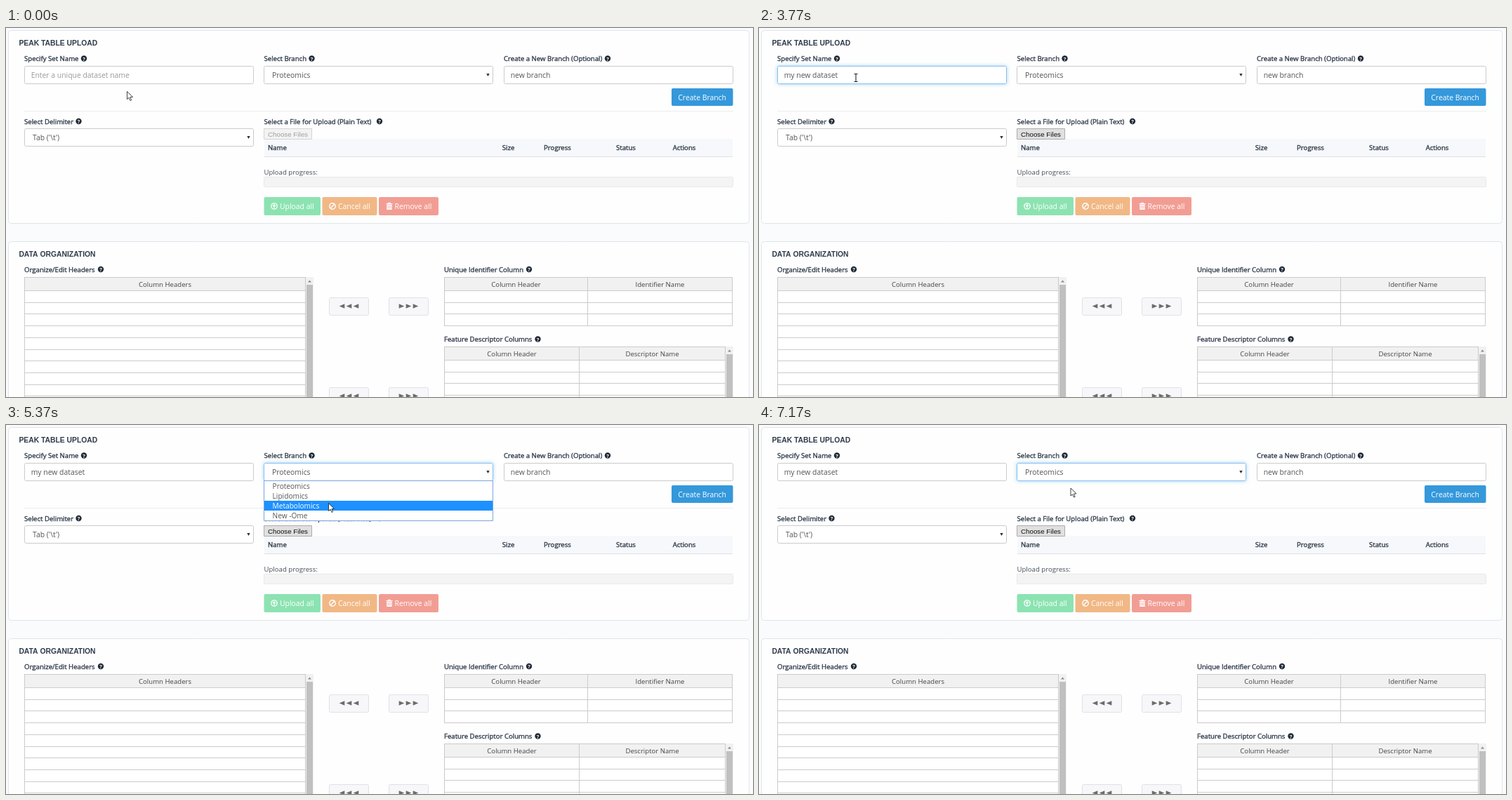
An HTML page with a canvas for the animation above (8 s loop, 1064 by 526 pixels).

```html
<!DOCTYPE html>
<html lang="en">
<head>
<meta charset="utf-8">
<title>Peak table upload</title>
<style>
html, body { margin: 0; width: 100%; height: 100%; overflow: hidden; background: #fafbfd; }
canvas { display: block; }
</style>
</head>
<body>
<canvas id="stage" width="1064" height="526"></canvas>
<script>
const ctx = document.getElementById('stage').getContext('2d');
const LOOP = 8000;
const SANS = '"Open Sans", "Noto Sans", sans-serif';
const ARIAL = '"Liberation Sans", Arial, sans-serif';
const INK = '#2f3b4a', BODY = '#555', LINE = '#cbcbcb';
const GREEN = '#8ce3b1', ORANGE = '#f1b885', RED = '#f29d94', BLUE = '#3498db';
const ROW = 16.7;

// Time of each keystroke in the name field
const NAME = 'my new dataset';
const KEYS = [1130, 1300, 1500, 1670, 1760, 1840, 1930, 2300, 2430, 2570, 2630, 3000, 3100, 3200];

// Pointer stops: time, x, y, shape
const POINTER = [
  [0, 172, 90, 'arrow'], [70, 160, 81, 'arrow'], [200, 145, 67, 'beam'], [300, 138, 71, 'beam'],
  [4030, 170, 62, 'beam'], [4130, 222, 42, 'arrow'], [4230, 267, 28, 'arrow'],
  [4430, 469, 77, 'arrow'], [4570, 481, 82, 'arrow'], [4730, 477, 80, 'arrow'], [4800, 474, 74, 'arrow'],
  [4970, 471, 78, 'arrow'], [5170, 470, 84, 'arrow'], [5230, 467, 93, 'arrow'], [5300, 463, 103, 'arrow'],
  [5370, 459, 111, 'arrow'], [5430, 458, 114, 'arrow'], [5500, 457, 117, 'arrow'], [5570, 456, 120, 'arrow'],
  [5700, 456, 124, 'arrow'], [5800, 455, 126, 'arrow'], [5930, 455, 128, 'arrow'], [6030, 455, 129, 'arrow'],
  [6170, 454, 124, 'arrow'], [6260, 453, 118, 'arrow'], [6330, 452, 112, 'arrow'], [6400, 451, 106, 'arrow'],
  [6470, 448, 98, 'arrow'], [6600, 443, 89, 'arrow'], [6830, 444, 91, 'arrow'], [7170, 443.5, 89.5, 'arrow']
];
const OPTIONS = ['Proteomics', 'Lipidomics', 'Metabolomics', 'New -Ome'];
// Highlighted option: time, row
const HOVER = [[4970, 0], [5230, 1], [5370, 2], [5700, 3], [6260, 2], [6470, 1], [6600, 0]];

const last = (list, t) => list.filter(k => k[0] <= t).pop();

function fill(x, y, w, h, color) {
  ctx.fillStyle = color;
  ctx.fillRect(x, y, w, h);
}

function box(x, y, w, h, color, border, r = 0) {
  ctx.beginPath();
  ctx.roundRect(x + .5, y + .5, w - 1, h - 1, r);
  ctx.fillStyle = color;
  ctx.fill();
  ctx.strokeStyle = border;
  ctx.lineWidth = 1;
  ctx.stroke();
}

// Text is placed by the vertical middle of its capitals
function text(s, x, y, { size = 9.6, color = BODY, align = 'left', font = SANS, weight = 400, heavy = 0 } = {}) {
  ctx.font = `${weight} ${size}px ${font}`;
  ctx.textAlign = align;
  ctx.fillStyle = color;
  ctx.fillText(s, x, y + 3.5);
  if (heavy) {
    ctx.strokeStyle = color;
    ctx.lineWidth = heavy;
    ctx.strokeText(s, x, y + 3.5);
  }
}

const label = (s, x, y, align) => text(s, x, y, { color: INK, heavy: .35, align });
const heading = (s, y) => text(s, 18.4, y, { size: 10.35, color: INK, font: ARIAL, weight: 700 });

function poly(color, ...pts) {
  ctx.beginPath();
  for (let i = 0; i < pts.length; i += 2) ctx.lineTo(pts[i], pts[i + 1]);
  ctx.closePath();
  ctx.fillStyle = color;
  ctx.fill();
}

function path(color, width, ...pts) {
  ctx.beginPath();
  for (let i = 0; i < pts.length; i += 2) ctx.lineTo(pts[i], pts[i + 1]);
  ctx.strokeStyle = color;
  ctx.lineWidth = width;
  ctx.stroke();
}

function circle(x, y, r) {
  ctx.beginPath();
  ctx.arc(x, y, r, 0, Math.PI * 2);
}

function help(x, y) {
  circle(x, y, 4.2);
  ctx.fillStyle = '#202b38';
  ctx.fill();
  text('?', x, y - .5, { size: 7.6, color: '#fff', align: 'center', weight: 700 });
}

function field(x, y, s, color = BODY, glow = 0) {
  if (glow) {
    ctx.save();
    ctx.shadowColor = `rgba(102,175,233,${.5 * glow})`;
    ctx.shadowBlur = 5;
    box(x, y, 327, 26, '#fff', '#fff', 2);
    ctx.restore();
  }
  box(x, y, 327, 26, '#fff', glow ? '#85c0f0' : '#cbcbcb', 2);
  text(s, x + 9.7, y + 13, { size: 10.4, color });
}

function select(x, y, s, glow) {
  field(x, y, '', BODY, glow);
  text(s, x + 12, y + 13, { size: 10.4 });
  poly('#333', x + 317.3, y + 11, x + 321.7, y + 11, x + 319.5, y + 15);
}

function button(x, y, w, h, color, s, textX) {
  ctx.beginPath();
  ctx.roundRect(x, y, w, h, 2);
  ctx.fillStyle = color;
  ctx.fill();
  text(s, textX, y + 13, { size: 10.4, color: '#fff' });
}

function uploadButtons() {
  button(367.5, 241, 80.5, 26, GREEN, 'Upload all', 390);
  button(450.5, 241, 78, 26, ORANGE, 'Cancel all', 473);
  button(531, 241, 85, 26, RED, 'Remove all', 553.5);
  ctx.strokeStyle = '#fff';
  ctx.lineWidth = 1.3;
  circle(382, 254, 4.2);
  ctx.stroke();
  path('#fff', 1.4, 382, 256.8, 382, 252);
  poly('#fff', 379.3, 254, 382, 251, 384.7, 254);
  ctx.lineWidth = 1.4;
  circle(465, 254, 4.2);
  ctx.stroke();
  path('#fff', 1.4, 462, 257, 468, 251);
  fill(541.5, 250, 9, 1.2, '#fff');
  fill(544, 248.8, 4, 1, '#fff');
  fill(542.3, 251.8, 7.4, 7.2, '#fff');
  for (let i = 0; i < 3; i++) fill(543.7 + i * 2, 253, .7, 4.6, RED);
}

function table(x, y, w, split, heads, rows) {
  const h = 20 + Math.round(rows * ROW);
  fill(x, y, w, h, '#fff');
  fill(x, y, w, 19, '#f1f1f1');
  fill(x, y, w, 1, LINE);
  for (let i = 0; i <= rows; i++) fill(x, Math.round(y + 19 + i * ROW), w, 1, LINE);
  const edges = split ? [x, split, x + w - 1] : [x, x + w - 1];
  for (const e of edges) fill(e, y, 1, h, LINE);
  heads.forEach((s, i) =>
    text(s, (edges[i] + edges[i + 1]) / 2 + .5, y + 10, { color: '#444', align: 'center' }));
}

function scrollbar(x, y) {
  fill(x, y, 11, 526 - y, '#f1f1f1');
  poly('#8a8a8a', x + 3, y + 7.5, x + 8, y + 7.5, x + 5.5, y + 4.5);
  fill(x + 1, y + 11, 9, 526 - y, '#c0c0c0');
}

function arrows(x, y, dir) {
  box(x, y, 57, 26, '#f7f7fa', '#e0e1e6', 2);
  for (let i = -1; i <= 1; i++) {
    const c = x + 28.5 + i * 10, m = y + 12.5;
    poly('#6c6c6c', c - 3.8 * dir, m - 3.2, c + 3.8 * dir, m, c - 3.8 * dir, m + 3.2);
  }
}

function chooseFiles(on) {
  box(367, 143, 69, 16, on ? '#e0e0e0' : '#f3f3f3', on ? '#adadad' : '#d4d4d4');
  text('Choose Files', 401.5, 151, { size: 9.75, color: on ? '#111' : '#a0a0a0', align: 'center', font: ARIAL });
}

function nameField(t) {
  const glow = t < 470 ? 0 : t < 4430 ? 1 : t < 4570 ? .4 : 0;
  const typed = NAME.slice(0, KEYS.filter(k => k <= t).length);
  field(26, 54, typed || 'Enter a unique dataset name', typed ? BODY : '#999', glow);
  const caret = (t >= 470 && t < 830) || (t >= 1130 && t < 3770);
  if (caret) {
    ctx.font = `400 10.4px ${SANS}`;
    fill(Math.round(35.2 + ctx.measureText(typed).width), 60, 1, 14, '#333');
  }
}

function uploadPanel(t) {
  box(3, 3, 1056, 276, '#fefefe', '#e0e5ec', 4);
  heading('PEAK TABLE UPLOAD', 21);
  label('Specify Set Name', 26, 43.5);
  help(111, 43.5);
  label('Select Branch', 367.5, 43.5);
  help(435.5, 43.5);
  label('Create a New Branch (Optional)', 709, 43.5);
  help(857, 43.5);
  nameField(t);
  select(367, 54, 'Proteomics', t < 4970 ? 0 : t < 5170 ? .4 : 1);
  field(709, 54, 'new branch');
  button(948, 86, 87.5, 25, BLUE, 'Create Branch', 957.3);

  fill(26, 118, 1010, 1, '#e9ecf0');
  label('Select Delimiter', 26, 133);
  help(103.5, 133);
  select(26, 143, "Tab ('\\t')");
  label('Select a File for Upload (Plain Text)', 367.5, 133);
  help(532, 133);

  fill(368, 158, 667, 25, '#f6f8fb');
  fill(368, 183, 667, 1, '#dcdfe3');
  chooseFiles(t >= 1130);
  label('Name', 373, 170.5);
  label('Size', 715.5, 170.5, 'center');
  label('Progress', 785.5, 170.5, 'center');
  label('Status', 883, 170.5, 'center');
  label('Actions', 966, 170.5, 'center');
  text('Upload progress:', 367.5, 205.5, { color: '#444d58' });
  box(367, 212, 669, 15, '#f4f4f4', '#e9e9e9', 1);
  uploadButtons();
}

function dataPanel() {
  box(3, 304, 1056, 240, '#fefefe', '#e0e5ec', 4);
  heading('DATA ORGANIZATION', 322);
  label('Organize/Edit Headers', 26, 344);
  help(135, 344);
  table(26, 355, 401, 0, ['Column Headers'], 10);
  scrollbar(427, 355);
  for (const y of [384, 512]) {
    arrows(460, y, -1);
    arrows(545, y, 1);
  }
  label('Unique Identifier Column', 624, 344);
  help(745, 344);
  table(624, 355, 411, 828, ['Column Header', 'Identifier Name'], 3);
  label('Feature Descriptor Columns', 624, 443.5);
  help(757.5, 443.5);
  table(624, 454, 401, 816, ['Column Header', 'Descriptor Name'], 4);
  scrollbar(1025, 454);
}

function dropdown(t) {
  if (t < 4970 || t >= 7170) return;
  const row = last(HOVER, t)[1];
  box(367, 79, 327, 58, '#fff', '#7ba6de');
  fill(368, 80 + row * 14, 325, 14, '#1e90ff');
  OPTIONS.forEach((s, i) =>
    text(s, 379.6, 87 + i * 14, { size: 10.15, color: i === row ? '#fff' : BODY }));
}

function pointer(t) {
  const [, x, y, shape] = last(POINTER, t);
  if (shape === 'beam') {
    path('#222', 1, x - 2.5, y - 5.5, x + 2.5, y - 5.5);
    path('#222', 1, x - 2.5, y + 5.5, x + 2.5, y + 5.5);
    path('#222', 1.1, x, y - 5.5, x, y + 5.5);
    return;
  }
  ctx.save();
  ctx.translate(x + .5, y + .5);
  poly('#fff', 0, 0, 0, 11, 2.6, 8.8, 4.5, 13, 6.2, 12.2, 4.4, 8.1, 8, 7.9);
  ctx.lineJoin = 'round';
  ctx.lineWidth = .85;
  ctx.strokeStyle = '#222';
  ctx.stroke();
  ctx.restore();
}

function draw(t) {
  fill(0, 0, 1064, 526, '#fafbfd');
  uploadPanel(t);
  dataPanel();
  dropdown(t);
  pointer(t);
}

const start = performance.now();
function tick() {
  draw((performance.now() - start) % LOOP);
  requestAnimationFrame(tick);
}
tick();
</script>
</body>
</html>
```
